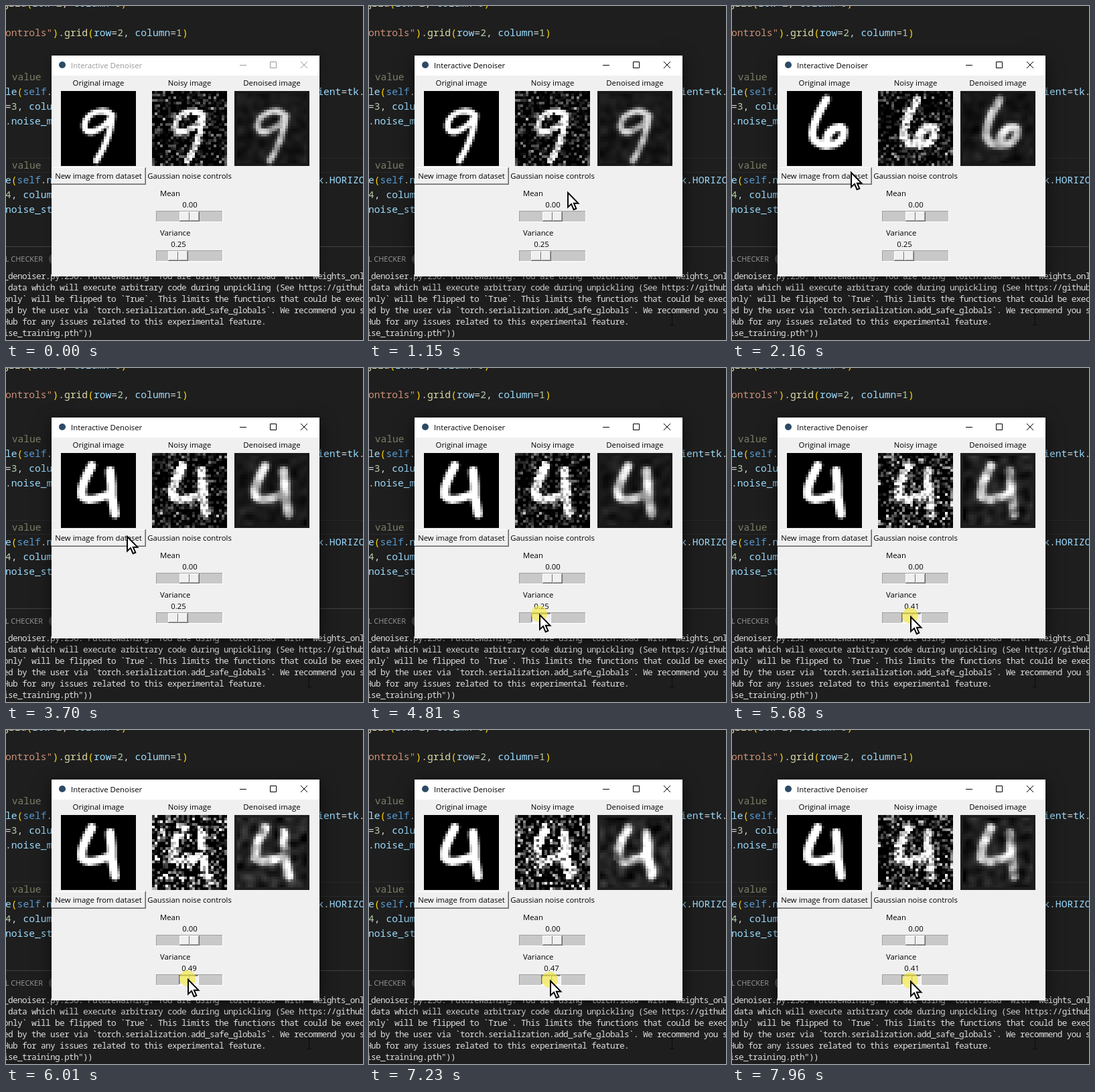
An HTML page with a canvas for the animation above (8000 ms loop, 533 by 499 pixels).

```html
<!DOCTYPE html>
<html lang="en">
<head>
<meta charset="utf-8">
<title>Interactive Denoiser</title>
<style>
html, body { margin: 0; width: 100%; height: 100%; overflow: hidden; background: #1e1e1e; }
canvas { display: block; }
</style>
</head>
<body>
<canvas id="stage" width="533" height="499"></canvas>
<script>
const ctx = document.getElementById('stage').getContext('2d');
const LOOP = 8000, STEP = 70, N = 28, CELL = 4;
const sans = size => `${size}px "Open Sans", "Noto Sans", sans-serif`;
const mono = size => `${size}px "Noto Sans Mono", "DejaVu Sans Mono", monospace`;

// Editor text by line; right-hand parts start at the column given
const CODE_W = 8.797, RIGHT = 53;
const codeLines = [
  [0, -1.4, '.grid(row=2, column=0)'],
  [2, 0, 'ontrols").grid(row=2, column=1)'],
  [5, 1.1, 'value'],
  [6, 0, 'le(self.n'],
  [6, RIGHT, 'ient=tk.'],
  [7, 0, '=3, colum'],
  [8, 0, '.noise_me'],
  [11, 1.1, 'value'],
  [12, 0, 'e(self.no'],
  [12, RIGHT, 'k.HORIZO'],
  [13, 0, '4, column'],
  [14, 0, 'noise_std']
];
const syntax = [
  [/^\w+"/, '#ce9178'],
  [/^[()]/, '#ffd700'],
  [/^\d/, '#b5cea8'],
  [/^grid/, '#dcdcaa'],
  [/^self/, '#569cd6'],
  [/^value/, '#7d7d68'],
  [/^\w+/, '#9cdcfe'],
  [/^./, '#d4d4d4']
];

const termLines = [
  '_denoiser.py:256: FutureWarning: You are using `torch.load` with `weights_only',
  ' data which will execute arbitrary code during unpickling (See https://github.',
  'only` will be flipped to `True`. This limits the functions that could be execu',
  'ed by the user via `torch.serialization.add_safe_globals`. We recommend you st',
  'Hub for any issues related to this experimental feature.',
  'ise_training.pth"))'
];

// Handwritten digits as pen strokes on the 28 x 28 grid
const digits = {
  9: { pen: 2.3, path: 'M19 9C17 6.5 10 7 8.8 12.5C8 17 15 16 19.3 9Q18.5 18 13.2 26' },
  6: { pen: 3, path: 'M14.8 3Q9.5 12 9.5 16C9.5 22 21.5 22 21.3 15C21 11.5 14.5 14 14.7 19.5' },
  4: { pen: 3.4, path: 'M11.5 4.8Q7 13 7.8 16Q9.5 19 18.5 15.3M18.3 6.7Q19.2 12 19 16L20.2 22.8' }
};

// Cursor moves: start, end, x, y
const moves = [
  [250, 950, 296, 277],
  [1480, 1830, 177, 247],
  [3700, 4330, 276, 355],
  [4400, 4610, 254, 367],
  [5210, 5680, 265.8, 370],
  [5750, 6010, 271, 371],
  [6080, 6150, 272, 370],
  [6480, 6960, 272, 373],
  [7160, 7230, 270, 373],
  [7760, 7960, 265.8, 374]
];
const clicks = [[1020, 1150], [2030, 2160], [3160, 3300], [4810, LOOP]];
const GRAB = 254, DRAG = 5210;

function pointer(t) {
  let x = 452, y = 468;
  for (const [start, end, mx, my] of moves) {
    if (t < start) break;
    const n = Math.round((end - start) / STEP);
    const k = Math.floor((t - start) / (end - start) * n + .01) + 1;
    let p = Math.min(1, k / (n + 1));
    if (start < DRAG) p = p * p * (3 - 2 * p);
    x += (mx - x) * p;
    y += (my - y) * p;
  }
  const dragged = t < DRAG ? 0 : (x - GRAB) / 70;
  return { x: Math.round(x), y: Math.round(y), v: Math.floor((.25 + dragged) * 100 + .001) / 100 };
}

const clamp = a => Math.max(0, Math.min(1, a));
const grid = f => Array.from({ length: N * N }, (_, i) => f(i % N, Math.floor(i / N), i));

const pad = new OffscreenCanvas(N, N).getContext('2d', { willReadFrequently: true });
function rasterise({ pen, path }) {
  pad.clearRect(0, 0, N, N);
  pad.lineWidth = pen;
  pad.lineCap = pad.lineJoin = 'round';
  pad.stroke(new Path2D(path));
  const { data } = pad.getImageData(0, 0, N, N);
  return grid((x, y, i) => data[i * 4 + 3] / 255);
}

function blur(a) {
  const near = c => Math.max(0, Math.min(N - 1, c));
  return grid((x, y) => {
    let s = 0;
    for (let j = -1; j < 2; j++)
      for (let i = -1; i < 2; i++)
        s += a[near(y + j) * N + near(x + i)] * (2 - Math.abs(i)) * (2 - Math.abs(j));
    return s / 16;
  });
}

function rng(seed) {
  return () => {
    seed = seed + 0x6D2B79F5 | 0;
    let r = Math.imul(seed ^ seed >>> 15, 1 | seed);
    r = r + Math.imul(r ^ r >>> 7, 61 | r) ^ r;
    return ((r ^ r >>> 14) >>> 0) / 4294967296;
  };
}

let cache = {};
function pictures(digit, v) {
  const key = digit * 1000 + Math.round(v * 100);
  if (cache.key === key) return cache;
  const rand = rng(key);
  const gauss = () => Math.sqrt(-2 * Math.log(1 - rand())) * Math.cos(2 * Math.PI * rand());
  const clean = rasterise(digits[digit]);
  const noise = grid(gauss);
  const soft = blur(clean), blot = blur(blur(noise));
  const noisy = clean.map((c, i) => clamp(c + v * noise[i]));
  const denoised = grid((x, y, i) => {
    const edge = x % (N - 1) === 0 || y % (N - 1) === 0;
    const b = edge ? 0 : v * blot[i];
    return clamp(.06 + .13 * v + (clean[i] + soft[i]) * .36 * (1 + 1.6 * b) + .35 * b);
  });
  return cache = { key, clean, noisy, denoised };
}

function picture(label, a, x0) {
  text(label, x0 + 56, 119, '#000', 'center');
  a.forEach((c, i) => {
    const g = Math.round(c * 255);
    rect(x0 + i % N * CELL, 127 + Math.floor(i / N) * CELL, CELL, CELL, `rgb(${g},${g},${g})`);
  });
}

function rect(x, y, w, h, color) {
  ctx.fillStyle = color;
  ctx.fillRect(x, y, w, h);
}

function disc(x, y, r, color) {
  ctx.fillStyle = color;
  ctx.beginPath();
  ctx.arc(x, y, r, 0, 7);
  ctx.fill();
}

function text(s, x, y, color = '#000', align = 'left', font = sans(11.35)) {
  ctx.font = font;
  ctx.textAlign = align;
  ctx.fillStyle = color;
  ctx.fillText(s, x, y);
}

function bevel(x, y, w, h, face, light, dark) {
  rect(x, y, w, h, dark);
  rect(x, y, w - 1, h - 1, light);
  rect(x + 1, y + 1, w - 2, h - 2, face);
}

function relief(x, y, w, h, down) {
  const outer = ['#fff', '#696969'], inner = ['#f0f0f0', '#a0a0a0'];
  if (down) [outer, inner].forEach(p => p.reverse());
  bevel(x, y, w, h, '#f0f0f0', ...outer);
  bevel(x + 1, y + 1, w - 2, h - 2, '#f0f0f0', ...inner);
}

function codeLine([row, col, s]) {
  let x = col * CODE_W - 1;
  while (s) {
    const [rule, color] = syntax.find(([r]) => r.test(s));
    const token = s.match(rule)[0];
    text(token, x, 1 + row * 22, color, 'left', mono(14.66));
    x += token.length * CODE_W;
    s = s.slice(token.length);
  }
}

function editor() {
  rect(0, 0, 533, 499, '#1e1e1e');
  rect(0, 227, 533, 1, '#2a2a2a');
  rect(0, 248, 533, 1, '#2a2a2a');
  codeLines.forEach(codeLine);
  rect(0, 359, 533, 1, '#424242');
  text('LL CHECKER', 55, 382, '#989898', 'right', sans(11));
  disc(73, 378, 9, '#4d4d4d');
  ctx.letterSpacing = '-0.68px';
  termLines.forEach((s, i) => text(s, -4, 408 + i * 17, '#dedede', 'left', mono(12.8)));
  ctx.letterSpacing = '0px';
}

function frame(active) {
  ctx.save();
  ctx.shadowColor = active ? 'rgba(0,0,0,.6)' : 'rgba(0,0,0,.35)';
  ctx.shadowBlur = active ? 22 : 10;
  ctx.shadowOffsetY = active ? 5 : 2;
  rect(68, 74, 400, 330, '#f0f0f0');
  ctx.restore();
  rect(68, 74, 400, 30, '#fff');
  const ink = active ? '#000' : '#999';
  disc(84, 88, 5, '#2b4a66');
  text('Interactive Denoiser', 97, 93, ink);
  ctx.strokeStyle = ink;
  ctx.lineWidth = 1;
  ctx.beginPath();
  ctx.moveTo(349, 88.5); ctx.lineTo(359, 88.5);
  ctx.rect(394.5, 83.5, 9, 9);
  ctx.moveTo(440, 83); ctx.lineTo(450, 93);
  ctx.moveTo(450, 83); ctx.lineTo(440, 93);
  ctx.stroke();
}

function button(down) {
  relief(68, 241, 141, 26, down);
  text('New image from dataset', 138 + down, 258 + down, '#000', 'center');
}

function slider(label, value, pos, y, down) {
  const x = Math.round(225 + pos * 68);
  text(label, 230, y - 22);
  text(value.toFixed(2), x + 15.5, y - 5, '#000', 'center');
  bevel(224, y, 100, 17, '#c8c8c8', '#a0a0a0', '#fff');
  relief(x, y + 1, 30, 15, down);
  rect(x + 14, y + 2, 1, 13, down ? '#fff' : '#696969');
  rect(x + 15, y + 2, 1, 13, down ? '#696969' : '#fff');
}

function ibeam(x, y) {
  rect(x, y - 8, 1, 17, '#0c0c0c');
  for (const end of [-8, 8]) rect(x - 3, y + end, 7, 1, '#0c0c0c');
}

const arrowShape = new Path2D('M0 0V15.3L3.6 12L6.2 18L8.8 16.9L6.3 11.2H11Z');
function arrow(x, y) {
  ctx.save();
  ctx.translate(x + 1, y + 2);
  ctx.scale(1.4, 1.4);
  ctx.fillStyle = '#fff';
  ctx.fill(arrowShape);
  ctx.lineWidth = 1.4;
  ctx.strokeStyle = '#000';
  ctx.stroke(arrowShape);
  ctx.restore();
}

function draw(t) {
  const { x, y, v } = pointer(t);
  const press = clicks.findIndex(([a, b]) => t >= a && t < b);
  const digit = t < clicks[1][1] ? 9 : t < clicks[2][1] ? 6 : 4;
  const { clean, noisy, denoised } = pictures(digit, v);
  const moved = t >= moves[0][0];

  editor();
  if (moved) ibeam(452, 468);
  frame(t >= clicks[0][0]);
  picture('Original image', clean, 82);
  picture('Noisy image', noisy, 218);
  picture('Denoised image', denoised, 341);
  button(press === 1 || press === 2);
  text('Gaussian noise controls', 274, 258, '#000', 'center');
  slider('Mean', 0, .5, 306, false);
  slider('Variance', v, v, 365, press === 3);

  if (press >= 0) disc(x, y, 12, 'rgba(245,232,60,.65)');
  if (moved) (y > 404 ? ibeam : arrow)(x, y);
}

const begin = performance.now();
function tick() {
  draw((performance.now() - begin) % LOOP);
  requestAnimationFrame(tick);
}
tick();
</script>
</body>
</html>
```
